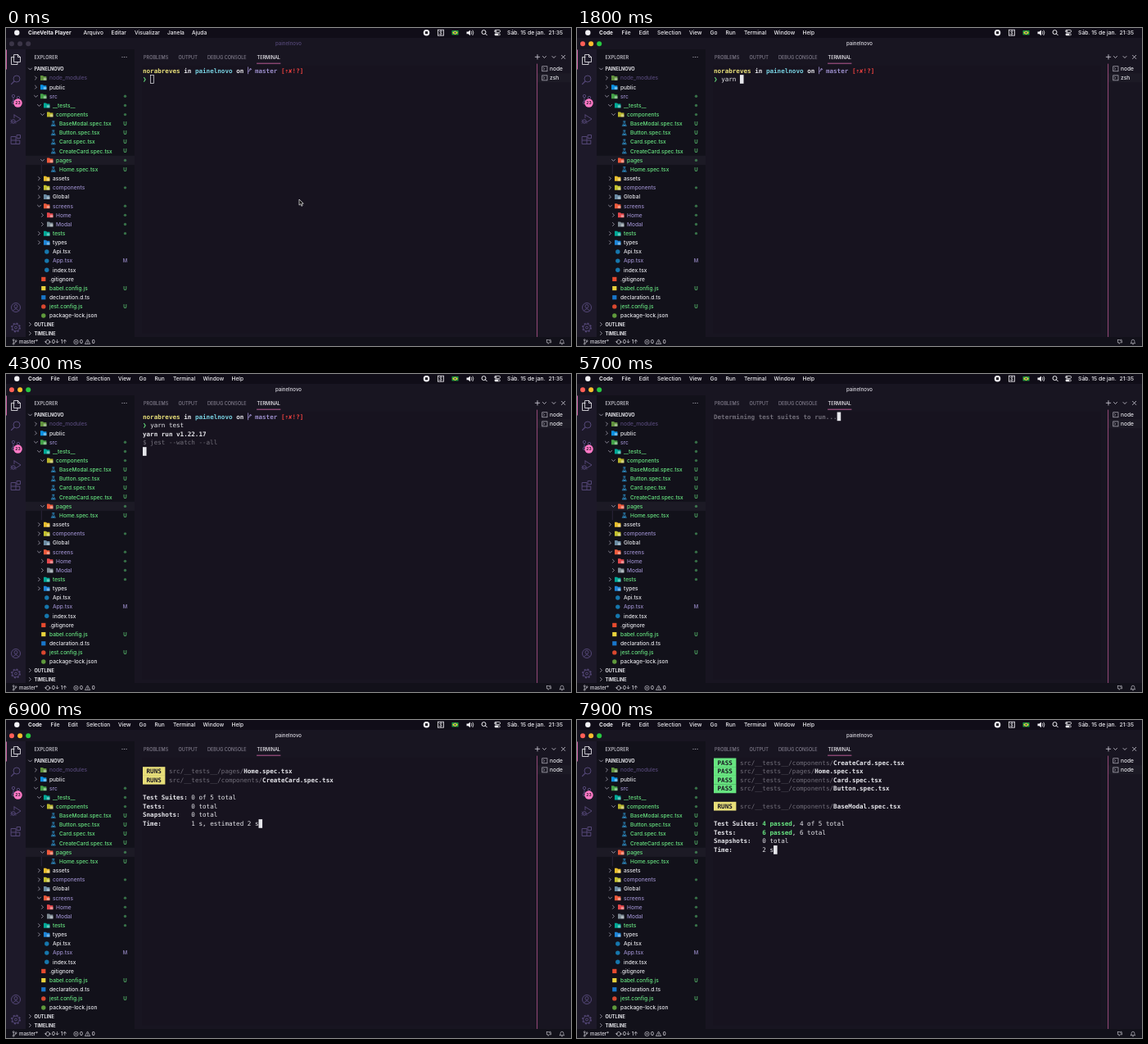
An HTML page that plays this animation: 690 by 388 pixels, repeating every 8 s.

```html
<!DOCTYPE html>
<html lang="en">
<head>
<meta charset="utf-8">
<title>Terminal test run</title>
<style>
html, body { margin: 0; width: 100%; height: 100%; overflow: hidden; background: #191622; }
svg { display: block; width: 100vw; height: 100vh; }
text { white-space: pre; font-family: Inter, Roboto, sans-serif; }
.mono { font-family: "DejaVu Sans Mono", "Noto Sans Mono", monospace; font-size: 7.58px; font-variant-ligatures: none; }
</style>
</head>
<body>
<svg id="stage" viewBox="0 0 690 388">
  <g id="chrome"></g>
  <g id="window"></g>
  <g id="terminal"></g>
  <g id="pointer"><path d="M0 0V7.2L1.7 5.7L2.9 8.3L4.2 7.7L3 5.2H5.3Z" fill="#111" stroke="#eee" stroke-width=".7"/></g>
</svg>
<script>
const LOOP = 8000;
const USER = 'norabreves', PROJECT = 'painelnovo';
const C = {
  term: '#181521', side: '#12111a', bar: '#1d1929', row: '#1c1a25', text: '#e6e6eb', dim: '#716e79',
  green: '#67e480', yellow: '#e7de79', cyan: '#78d1e1', purple: '#988bc7',
  pink: '#ff79c6', muted: '#544777'
};
const byId = id => document.getElementById(id);

const rect = (x, y, w, h, fill, extra = '') =>
  `<rect x="${x}" y="${y}" width="${w}" height="${h}" fill="${fill}" ${extra}/>`;
const disc = (x, y, r, fill, extra = '') => `<circle cx="${x}" cy="${y}" r="${r}" fill="${fill}" ${extra}/>`;
const ring = (x, y, r, stroke, w = 1) => disc(x, y, r, 'none', `stroke="${stroke}" stroke-width="${w}"`);
const line = (d, stroke, w = .8, extra = '') =>
  `<path d="${d}" fill="none" stroke="${stroke}" stroke-width="${w}" stroke-linecap="round" stroke-linejoin="round" ${extra}/>`;
const label = (x, mid, str, fill = C.text, size = 6.6, weight = 500, extra = '') =>
  `<text x="${x}" y="${mid + size * .36}" font-size="${size}" font-weight="${weight}" fill="${fill}" ${extra}>${str}</text>`;
const at = (x, y, body) => `<g transform="translate(${x} ${y})">${body}</g>`;
const chevron = (x, y, open, stroke = '#aaa6b5') =>
  line(open ? `M${x - 2} ${y - 1}l2 2l2-2` : `M${x - 1} ${y - 2}l2 2l-2 2`, stroke, .8);

/* ---- explorer ---- */
const folder = (x, y, fill) =>
  `<path d="M${x - 3.8} ${y - 3}h3l1 1h3.4v5h-7.4z" fill="${fill}"/>` + rect(x, y - .2, 3.8, 3, '#fff', 'opacity=".4"');
const flask = (x, y) =>
  line(`M${x - 1.2} ${y - 2.9}h2.4M${x - .7} ${y - 2.9}v2.3l-1.9 3.4h5.2l-1.9-3.4v-2.3`, '#2f8fc6', .7) +
  rect(x - 1.4, y + 1, 2.8, 1.5, '#2f8fc6');
const dot = fill => (x, y) => disc(x, y, 2.7, fill);
const square = fill => (x, y) => rect(x - 2.6, y - 2.6, 5.2, 5.2, fill);
const blueDot = dot('#1677ad');

// name, depth, text colour, folder colour or file icon, mark, open
const TREE = [
  ['node_modules', 0, C.muted, '#5f8f3c'],
  ['public', 0, C.text, '#0b8fe0'],
  ['src', 0, C.purple, '#43a047', 'dot', 1],
  ['__tests__', 1, C.green, '#00a896', 'dot', 1],
  ['components', 2, C.green, '#b9b52c', 'dot', 1],
  ...['BaseModal', 'Button', 'Card', 'CreateCard'].map(n => [n + '.spec.tsx', 3, C.green, flask, 'U']),
  ['pages', 2, C.green, '#ef5a3c', 'dot', 1],
  ['Home.spec.tsx', 3, C.green, flask, 'U'],
  ['assets', 1, C.text, '#e8bd2c'],
  ['components', 1, C.purple, '#c3c02e', 'dot'],
  ['Global', 1, C.text, '#6a8ba3'],
  ['screens', 1, C.purple, '#ef5a3c', 'dot', 1],
  ['Home', 2, C.purple, '#e5484d', 'dot'],
  ['Modal', 2, C.purple, '#7f8c95', 'dot'],
  ['tests', 1, C.green, '#00a896', 'dot'],
  ['types', 1, C.text, '#1d84d6'],
  ['Api.tsx', 1, C.text, blueDot],
  ['App.tsx', 1, C.purple, blueDot, 'M'],
  ['index.tsx', 1, C.text, blueDot],
  ['.gitignore', 0, C.text, square('#e64a2e')],
  ['babel.config.js', 0, C.green, square('#e8d23c'), 'U'],
  ['declaration.d.ts', 0, C.text, square('#1976c9')],
  ['jest.config.js', 0, C.green, dot('#d9482f'), 'U'],
  ['package-lock.json', 0, C.text, dot('#5f9a3c')]
];

function treeRow([name, depth, fill, icon, mark, open], i) {
  const y = 61 + i * 11.155, x = 53 + depth * 4;
  const isFile = typeof icon === 'function';
  let out = name === 'pages' ? rect(24, y - 5.6, 133, 11.1, C.row) : '';
  out += isFile ? icon(x - 7.2, y) : chevron(x - 16.5, y, open) + folder(x - 3.2 - 4, y, icon);
  out += label(x, y, name, fill);
  if (mark === 'dot') out += disc(145.5, y, 1.7, C.green, 'opacity=".45"');
  else if (mark) out += label(145.5, y, mark, fill, 6, 500, 'text-anchor="middle"');
  return out;
}

function explorer() {
  return rect(24, 26, 133, 351, C.side) +
    label(34.5, 35.5, 'EXPLORER', '#d3d1da', 5.57) +
    [142, 144.5, 147].map(x => disc(x, 35.5, .6, '#c9c6d2')).join('') +
    chevron(29.5, 50, true) + label(34.5, 50, PROJECT.toUpperCase(), C.text, 5.57, 700) +
    TREE.map(treeRow).join('') + line('M43.3 167V178', '#3b3350', .6) +
    rect(24, 356, 133, 21, C.side) +
    ['OUTLINE', 'TIMELINE'].map((s, i) =>
      chevron(29.5, 361.5 + i * 11, false) + label(34.5, 361.5 + i * 11, s, C.text, 5.57, 700)).join('');
}

/* ---- bars ---- */
function activityBar() {
  const s = C.muted;
  return rect(0, 26, 24, 351, C.bar) + rect(0, 26.5, 1, 24, C.pink, 'opacity=".8"') +
    at(12, 38.5, line('M-2-6H2.5L5.5-3V3H-2ZM-2-3H-5.5V6H2V3M2.5-6V-3H5.5', '#f0eff4')) +
    at(12, 63, ring(1, -1, 4, s) + line('M-2 2L-5.5 5.5', s, 1.1)) +
    at(12, 87, [[-3, -4], [-3, 4], [3, -2]].map(([x, y]) => ring(x, y, 1.7, s)).join('') +
      line('M-3-2.3V2.3M3-.3Q3 2-3 2', s, 1)) +
    disc(14.5, 91.5, 5.2, C.pink) + label(14.5, 91.6, '23', '#191622', 5, 600, 'text-anchor="middle"') +
    at(12, 111.5, line('M-2-5.5L6-.5L0 3.4M-2-5.5V-2', s, 1) + ring(-3, 2.5, 2.3, s) +
      line('M-6 .5L-5 1.4M-6 5L-5 4M0 5L-1 4M-6.2 2.7H-.6', s)) +
    at(12, 136, line('M-5.5-3.5H0V5.5H-5.5ZM-5.5 1H4.8V5.5H0M1.5-5.5H5.5V-1.5H1.5Z', s, 1)) +
    at(12, 341, ring(0, 0, 5.5, s) + ring(0, -1.5, 2, s) + line('M-3.5 4Q0-1 3.5 4', s, 1)) +
    at(12, 365.5, ring(0, 0, 4.3, s) + ring(0, 0, 1.5, s) +
      disc(0, 0, 5.2, 'none', `stroke="${s}" stroke-width="1.5" stroke-dasharray="2 2.08"`));
}

function menuStatus() {
  const w = '#f2f1f5';
  return disc(513.5, 5.7, 3.8, w) + rect(512, 4.2, 3, 3, '#16131e') +
    rect(527.5, 2.2, 7, 7, 'none', `stroke="${w}" stroke-width=".8"`) +
    line('M529 4L533 7.5M533 4H530.5M529 7.5H531M531 2.5V9', w, .6) +
    rect(544.5, 3, 8, 5.4, '#1f9a45') + '<path d="M548.5 3.5L552 5.7L548.5 7.9L545 5.7Z" fill="#f4d72c"/>' + disc(548.5, 5.7, 1.1, '#26468f') +
    `<path d="M562.5 4.5h2l2.4-2v6.8l-2.4-2h-2z" fill="${w}"/>` + line('M568.4 4.2Q569.6 5.8 568.4 7.5M570 3Q572 5.8 570 8.7', w) +
    ring(583.5, 5.1, 2.5, w) + line('M585.5 7L587.3 8.8', w, 1) +
    rect(596.6, 2.4, 7, 2.9, 'none', `rx="1.4" stroke="${w}" stroke-width=".8"`) + disc(598.2, 3.9, .9, w) +
    rect(596.6, 6.4, 7, 2.9, w, 'rx="1.4"') + disc(602, 7.9, .9, '#16131e') +
    label(612, 5.7, 'Sáb. 15 de jan.', w, 6.8) + label(680, 5.7, '21:35', w, 6.8, 500, 'text-anchor="end"');
}

function statusBar() {
  const y = 383, s = '#dcdae2';
  return rect(0, 377, 690, 11, C.side) +
    at(10.5, y, ring(-1.3, -2.4, .9, s, .6) + ring(-1.3, 2.4, .9, s, .6) + ring(1.7, -1.2, .9, s, .6) +
      line('M-1.3-1.5V1.5Q1.7 1.2 1.7-.3', s, .6)) +
    label(16, y, 'master*', s, 6.1) +
    at(51, y, line('M-2.6 .6A2.6 2.6 0 0 1 2.3-1M2.6-.6A2.6 2.6 0 0 1-2.3 1M-3.6-.4L-2.6 .7L-1.4-.3M3.6 .4L2.6-.7L1.4 .3', s, .7)) +
    label(56, y, '0↓ 1↑', s, 6.1) +
    at(85.5, y, ring(0, 0, 2.7, s, .6) + line('M-1-1L1 1M1-1L-1 1', s, .6)) + label(90, y, '0', s, 6.1) +
    at(99.8, y, line('M0-2.7L3 2.5H-3ZM0-.8V.7M0 1.6V1.7', s, .6)) + label(104.8, y, '0', s, 6.1) +
    at(663, y, line('M-2.6-2.4H0M-2.6-2.4V.8H-1V2.3L.6 .8H2.6V-.5', s, .6) + ring(1.5, -1.8, .9, s, .6)) +
    at(679, y, line('M-2.7 1.7H2.7L1.9 .5V-.8Q1.7-2.8 0-2.8T-1.9-.8V.5ZM-.6 2.8H.6', s, .6));
}

function panel() {
  const tabs = [['PROBLEMS', 168], ['OUTPUT', 210.5], ['DEBUG CONSOLE', 246], ['TERMINAL', 306.5]];
  const s = '#d5d2de';
  return rect(166, 46, 474, 327, '#17131f') +
    tabs.map(([n, x]) => label(x, 35.5, n, n === 'TERMINAL' ? '#f0eff4' : '#827e8d', 5.57)).join('') +
    line('M306.5 43.2H335', C.pink, .7, 'stroke-linecap="butt"') +
    line('M646.3 35.3H651.7M649 32.6V38', s) + chevron(657.5, 35.5, true, s) + chevron(669, 35.5, true, s) +
    line('M678.5 33.3L682.7 37.5M682.7 33.3L678.5 37.5', s) +
    rect(649, 55.2, 41, 11.1, C.row) + line('M648.6 44V377', C.pink, .7, 'opacity=".8"') +
    [49.8, 60.9].map(y => rect(654.8, y - 3, 6.2, 6, 'none', `stroke="${s}" stroke-width=".6"`) +
      line(`M656.4 ${y - 1.3}l1.3 1.3l-1.3 1.3`, s, .6)).join('') + label(664, 49.8, 'node');
}

byId('chrome').innerHTML = rect(0, 0, 690, 388, C.term) + rect(0, 0, 690, 12, '#100d18') +
  disc(13.3, 5.7, 3.2, '#f2f1f5') + menuStatus() + activityBar() + explorer() + panel() + statusBar();

const MENUS = {
  player: [['CineVelta Player', 27], ['Arquivo', 94.5], ['Editar', 128.5], ['Visualizar', 157], ['Janela', 197], ['Ajuda', 227]],
  editor: [['Code', 27], ['File', 54.5], ['Edit', 75.8], ['Selection', 98], ['View', 137], ['Go', 162.5], ['Run', 181.5],
    ['Terminal', 204], ['Window', 240.5], ['Help', 275.5]]
};
function windowState(active, task) {
  const lights = active ? ['#ff5f57', '#febc2e', '#28c840'] : Array(3).fill('#3b3547');
  return MENUS[active ? 'editor' : 'player'].map(([n, x], i) => label(x, 5.7, n, '#f2f1f5', 6.6, i ? 500 : 700)).join('') +
    lights.map((c, i) => disc(7 + i * 10.1, 19.2, 3, c)).join('') +
    label(345, 19.2, PROJECT, active ? '#dcdae2' : C.muted, 6.1, 500, 'text-anchor="middle"') +
    label(664, 60.9, task);
}

/* ---- terminal ---- */
const CELL = 4.565, ROW = 10.66;
const col = n => 167 + n * CELL, mid = n => 51.8 + n * ROW;
const put = (c, r, str, fill = C.text, weight = 400) =>
  `<text class="mono" x="${col(c)}" y="${mid(r) + 2.7}" fill="${fill}" font-weight="${weight}">${str}</text>`;
const caret = (c, r, hollow) => hollow
  ? rect(col(c) + .3, mid(r) - 5, CELL - .5, ROW - .6, 'none', `stroke="${C.text}" stroke-width=".7"`)
  : rect(col(c), mid(r) - 5.3, CELL, ROW, C.text);

const prompt = put(0, 0, USER, C.yellow, 700) + put(11, 0, 'in', C.text, 700) + put(14, 0, PROJECT, C.cyan, 700) +
  put(25, 0, 'on', C.text, 700) +
  at(col(28) + 2, mid(0), line('M-1.2-4V4M-1.2 1.5Q1.8 1 1.8-2M.6-1L1.8-2.6L3-1', C.purple, .9)) +
  put(30, 0, 'master', C.purple, 700) +
  ['[', '⇡', '✘', '!', '?', ']'].map((ch, i) => put(37 + i, 0, ch, '#e8413f', 700)).join('') +
  put(0, 1, '❯', C.green, 700);

function suiteLine(kind, name, row) {
  const dir = `src/__tests__/${name === 'Home' ? 'pages' : 'components'}/`;
  return rect(col(0), mid(row) - 5.3, CELL * 6, ROW + .1, kind === 'PASS' ? C.green : C.yellow) +
    put(1, row, kind, '#191622', 700) + put(7, row, dir, C.dim) +
    put(7 + dir.length, row, name + '.spec.tsx', C.text, 700);
}

function report({ pass = [], runs, suites = 0, tests = 0, time }) {
  const first = pass.length + 1, top = first + runs.length + 1;
  const total = (row, passed, rest) => {
    const head = passed ? `${passed} passed` : '';
    return put(13, row, head, C.green, 700) + put(13 + head.length, row, (head && ', ') + rest);
  };
  return pass.map((n, i) => suiteLine('PASS', n, i)).join('') +
    runs.map((n, i) => suiteLine('RUNS', n, first + i)).join('') +
    ['Test Suites:', 'Tests:', 'Snapshots:', 'Time:'].map((s, i) => put(0, top + i, s, C.text, 700)).join('') +
    total(top, suites, `${suites} of 5 total`) + total(top + 1, tests, `${tests} total`) +
    put(13, top + 2, '0 total') + put(13, top + 3, time) + caret(13 + time.length, top + 3);
}

const typed = (str, hollow) => prompt + put(2, 1, str) + caret(2 + str.length, 1, hollow);
const notice = 'Determining test suites to run...';
const order = ['CreateCard', 'Home', 'Card', 'Button', 'BaseModal'];
const estimate = s => `${s} s, estimated 2 s`;
const launched = prompt + put(2, 1, 'yarn test');

const SCREENS = [
  [0, typed('', true)],
  [400, typed('')],
  [1200, typed('y')], [1300, typed('ya')], [1400, typed('yar')], [1600, typed('yarn')], [1700, typed('yarn ')],
  [2900, typed('yarn t')], [3000, typed('yarn te')], [3200, typed('yarn tes')], [3400, typed('yarn test')],
  [4000, launched + caret(0, 2)],
  [4300, launched + put(0, 2, 'yarn run v1.22.17', C.text, 700) + put(0, 3, '$ jest --watch --all', C.dim) + caret(0, 4)],
  [5700, put(0, 0, notice, C.dim, 700) + caret(notice.length, 0)],
  [5800, report({ runs: ['Home', 'CreateCard'], time: estimate(0) })],
  [6900, report({ runs: ['Home', 'CreateCard'], time: estimate(1) })],
  [7300, report({ pass: order.slice(0, 1), runs: ['Home', 'CreateCard'], time: estimate(1) })],
  [7600, report({ pass: order.slice(0, 2), runs: ['Card', 'Button'], suites: 2, tests: 3, time: estimate(1) })],
  [7800, report({ pass: order.slice(0, 3), runs: ['Button', 'BaseModal'], suites: 3, tests: 5, time: '2 s' })],
  [7900, report({ pass: order.slice(0, 4), runs: ['BaseModal'], suites: 4, tests: 6, time: '2 s' })]
];
const POINTER = [[0, 358, 209], [100, 327, 161], [200, 310, 126], [300, 307, 95]];
const latest = (list, t) => list.filter(([start]) => start <= t).pop();

const shown = {};
function paint(id, html) {
  if (shown[id] !== html) byId(id).innerHTML = shown[id] = html;
}

function render(t) {
  paint('window', windowState(t >= 400, t >= 4100 ? 'node' : 'zsh'));
  paint('terminal', latest(SCREENS, t)[1]);
  const [, x, y] = latest(POINTER, t);
  const pointer = byId('pointer');
  pointer.setAttribute('transform', `translate(${x} ${y})`);
  pointer.setAttribute('visibility', t < 1200 ? 'visible' : 'hidden');
}

function tick() {
  render(performance.now() % LOOP);
  requestAnimationFrame(tick);
}
tick();
</script>
</body>
</html>
```
